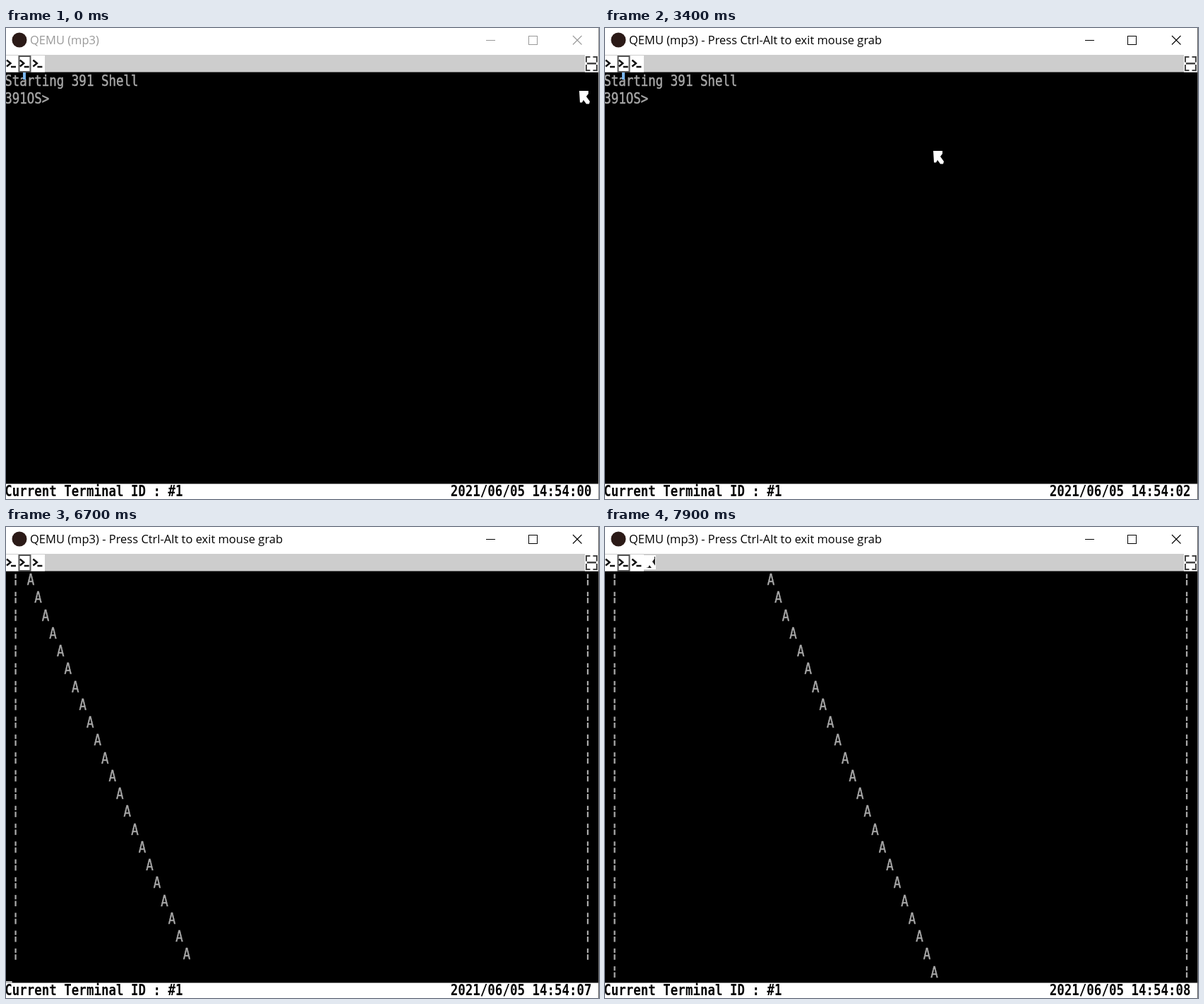
These frames come from a looping animation (840x667 px, 8000 ms). An HTML page with a canvas:

```html
<!DOCTYPE html>
<html lang="en">
<head>
<meta charset="utf-8">
<title>Terminal</title>
<style>
html, body { margin: 0; width: 100%; height: 100%; overflow: hidden; background: #000; }
canvas { display: block; width: 840px; height: 667px; }
</style>
</head>
<body>
<canvas id="stage" width="840" height="667"></canvas>
<script>
const ctx = document.getElementById('stage').getContext('2d');
const LOOP = 8000, STEP = 100;
const CELL_W = 10.526, CELL_H = 25.25, LEFT = -1.8, TOP = 63;
const LAST_ROW = 22, PIXEL_ASPECT = 1.2;
const GRAY = '#a8a8a8';
const PROMPT = '391OS> ', COMMAND = 'pingpong';
const FOCUS_AT = 1400, TYPE_AT = 4300, KEY_MS = 120, RUN_AT = 5500;
const LINES_PER_MS = 0.01635;

const colX = c => LEFT + c * CELL_W;
const rowY = r => TOP + r * CELL_H;
const clamp = (v, lo, hi) => Math.min(hi, Math.max(lo, v));

// The status clock stalls at two seconds, then catches up.
function seconds(t) {
  return t < 4600 ? Math.min(2, Math.floor(t / 900)) : 5 + Math.floor((t - 4600) / 830);
}

const cursorOn = t => Math.floor((t + 60) / 857) % 2 === 1;
const typedCount = t => clamp(1 + Math.floor((t - TYPE_AT) / KEY_MS), 0, COMMAND.length);

// Interpolates through a few [time, x, y] points, holding at both ends.
function along(points, t) {
  let [, x, y] = points[0];
  for (let i = 1; i < points.length; i++) {
    const [t0, x0, y0] = points[i - 1], [t1, x1, y1] = points[i];
    const p = clamp((t - t0) / (t1 - t0), 0, 1);
    x += (x1 - x0) * p;
    y += (y1 - y0) * p;
  }
  return [x, y];
}

function pointerAt(t) {
  return t < RUN_AT
    ? along([[1600, 812, 89], [1800, 745, 42], [2200, 526, 130], [2800, 465, 174]], t)
    : along([[7200, 331, 147], [7900, 57, 41]], t);
}

function rect(color, x, y, w, h) {
  ctx.fillStyle = color;
  ctx.fillRect(x, y, w, h);
}

function frame(color, width, x, y, w, h) {
  ctx.strokeStyle = color;
  ctx.lineWidth = width;
  ctx.strokeRect(x, y, w, h);
}

function line(color, width, ...pts) {
  ctx.strokeStyle = color;
  ctx.lineWidth = width;
  ctx.beginPath();
  for (let i = 0; i < pts.length; i += 2) ctx.lineTo(pts[i], pts[i + 1]);
  ctx.stroke();
}

// The emulated screen has tall pixels, so its text shares one display aspect.
function screenText(str, col, baseline, color = GRAY, weight = 'normal') {
  ctx.save();
  ctx.translate(colX(col), baseline);
  ctx.scale(1, PIXEL_ASPECT);
  ctx.font = weight + ' 17.484px "DejaVu Sans Mono", monospace';
  ctx.fillStyle = ctx.strokeStyle = color;
  ctx.lineWidth = 0.4;
  ctx.fillText(str, 0, 0);
  if (weight === 'normal') ctx.strokeText(str, 0, 0);
  ctx.restore();
}

const rowText = (str, col, row) => screenText(str, col, rowY(row) + 19.2);

function drawTitle(t) {
  const active = t >= FOCUS_AT, hover = t >= 400 && t < 500;
  const ink = active ? '#000' : '#999';
  rect('#fff', 0, 0, 840, 38);
  ctx.fillStyle = '#2b1a17';
  ctx.beginPath();
  ctx.arc(19, 17, 10.5, 0, Math.PI * 2);
  ctx.fill();
  ctx.font = '16.5px "Open Sans", sans-serif';
  ctx.fillStyle = ink;
  ctx.fillText('QEMU (mp3)' + (active ? ' - Press Ctrl-Alt to exit mouse grab' : ''), 34, 23);
  if (hover) rect('#e81123', 779, 0, 60, 36);
  line(ink, 1, 680, 17.5, 693, 17.5);
  frame(ink, 1, 740.5, 11.5, 12, 12);
  const cross = hover ? '#fff' : ink;
  line(cross, 1.1, 803, 11, 815.5, 23.5);
  line(cross, 1.1, 815.5, 11, 803, 23.5);
}

function drawBar() {
  rect('#cdcdcd', 0, 38, 840, 24.5);
  rect('#fff', 0, 39, 55, 23.5);
  frame('#555', 2, 18.5, 40, 16, 22);
  for (let i = 0; i < 3; i++) {
    const x = 1 + i * 18.7;
    line('#111', 2.5, x, 45.5, x + 5.5, 50, x, 54.5);
    line('#111', 2.5, x + 6, 55, x + 13, 55);
  }
  rect('#fff', 820, 38, 19, 24.5);
  frame('#444', 2, 822, 41, 15, 19);
  rect('#fff', 827.5, 39, 4, 23);
  rect('#fff', 820, 48.5, 19, 3.5);
  rect('#444', 823, 49, 13, 2.5);
}

function drawBall(n, row) {
  const y = rowY(row);
  for (const wall of [1, 78]) {
    rect(GRAY, colX(wall) + 3.7, y + 3.6, 2.3, 6.2);
    rect(GRAY, colX(wall) + 3.7, y + 12, 2.3, 7.6);
  }
  rowText('A', n + 1, row);
}

function drawShell(t) {
  const running = t >= RUN_AT;
  const progress = running ? 15.1 + (t - 6200) * LINES_PER_MS : 0;
  const done = Math.floor(progress);
  const printing = progress - done > 0.85;
  const scroll = Math.max(0, done + 2 - LAST_ROW);
  const typed = COMMAND.slice(0, typedCount(t));
  if (scroll < 1) {
    rowText('Starting 391 Shell', 0, 0);
    rect('#79b5ee', 24, 63, 4, 10);
  }
  if (scroll < 2) rowText(PROMPT + typed, 0, 1 - scroll);
  const count = done + (printing ? 1 : 0);
  for (let n = Math.max(1, scroll - 1); n <= count; n++) drawBall(n, n + 1 - scroll);
  if (cursorOn(t) && !printing) {
    const col = running ? 0 : PROMPT.length + typed.length;
    const row = running ? done + 2 - scroll : 1;
    rect('#d0d0d0', colX(col), rowY(row) + 24.7, 10.5, 2.3);
  }
}

function drawPointer(t) {
  if (t >= RUN_AT && t < 6800) return;
  const [x, y] = pointerAt(t);
  if (y < 55) {
    rect('#fff', x - 2, y - 1, 17, 20);
    rect('#222', x + 2, y + 1, 12, 16);
  }
  ctx.fillStyle = '#fff';
  ctx.beginPath();
  const outline = [[0, 0], [13, 0], [13, 4], [10, 8], [15, 15], [14, 18.5], [10, 18.5], [6, 13], [4, 16.5], [1, 16.5]];
  for (const [dx, dy] of outline) ctx.lineTo(x + dx, y + dy);
  ctx.fill();
}

function drawStatus(t) {
  rect('#fff', 0, 645.5, 840, 21.5);
  const ink = (str, col) => screenText(str, col, 662.8, '#000', 'bold');
  ink('Current Terminal ID : #1', 0);
  ink('2021/06/05 14:54:0' + seconds(t), 60);
}

function draw(now) {
  const t = Math.floor((now % LOOP) / STEP) * STEP;
  rect('#000', 0, 0, 840, 667);
  drawTitle(t);
  drawBar();
  drawShell(t);
  drawStatus(t);
  rect(t < FOCUS_AT ? '#999' : '#666', 839, 0, 1, 667);
  drawPointer(t);
}

const start = performance.now();
function tick() {
  draw(performance.now() - start);
  requestAnimationFrame(tick);
}
tick();
</script>
</body>
</html>
```
